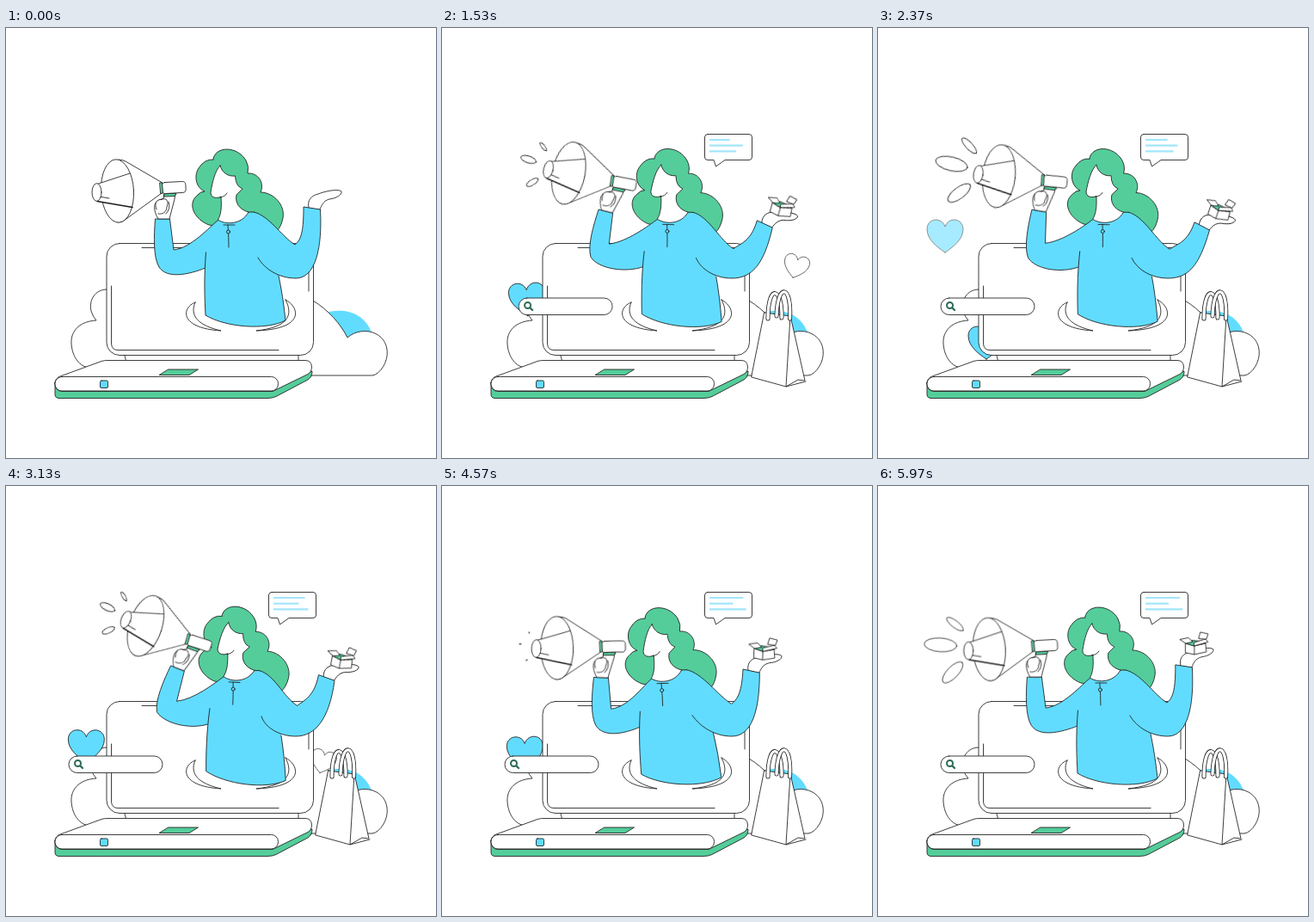
Recreate the animation shown at these times as an HTML page. Size 500x500 px, loop 6 s.

```html
<!DOCTYPE html>
<html lang="en">
<head>
<meta charset="utf-8">
<title>Online announcement</title>
<style>
  html, body { margin: 0; width: 100%; height: 100%; overflow: hidden; background: #fff; }
  svg { display: block; width: 100vw; height: 100vh; }
  .ink { fill: #fff; stroke: #1c1c1c; stroke-width: .85; stroke-linejoin: round; stroke-linecap: round; }
  .line { fill: none; }
  .blue { fill: #61dcff; }
  .green { fill: #54cd9a; }
  .bare { stroke: none; }
  .pop { transform-box: fill-box; transform-origin: center; animation: 6s linear infinite both; }
  #bag { animation-name: bag; }
  #box { animation-name: box; transform-origin: 50% 100%; }
  #bubble { animation-name: bubble; transform-origin: 20% 100%; }
  #search { animation-name: search; }
  @keyframes bag {
    0%, 7% { transform: scale(0); animation-timing-function: ease-out; }
    14% { transform: scale(1.1); animation-timing-function: ease-in-out; }
    19%, 100% { transform: none; }
  }
  @keyframes box {
    0%, 5% { transform: scale(0); animation-timing-function: ease-out; }
    12% { transform: scale(1.12); animation-timing-function: ease-in-out; }
    16%, 100% { transform: none; }
  }
  @keyframes bubble {
    0%, 10% { transform: scale(0); animation-timing-function: ease-out; }
    19%, 100% { transform: none; }
  }
  @keyframes search {
    0%, 15% { transform: translateX(70px); opacity: 0; animation-timing-function: ease-out; }
    20% { opacity: 1; }
    33%, 100% { transform: none; opacity: 1; }
  }
</style>
</head>
<body>
<svg viewBox="0 0 500 500" class="ink">
  <defs>
    <path id="heart" d="M0 19 C-9 13 -21 4 -21 -8 C-21 -21 -4 -23 0 -11 C4 -23 21 -21 21 -8 C21 4 9 13 0 19 Z"/>
  </defs>

  <!-- clouds -->
  <path class="blue bare" d="M372 331 C392 325 416 330 425 354 L397 362 Z"/>
  <path d="M117 304 C104 304 96 316 99 329 Q101 336 105 340 C86 341 75 352 76 367 C77 383 86 394 97 395 L140 390 Z"/>
  <path d="M357 317 C375 328 389 344 397 360 C406 352 420 350 431 356 C445 364 446 381 439 393 Q433 403 426 404 H340 V317 Z"/>
  <g id="hearts"></g>

  <!-- laptop -->
  <rect x="117" y="250.5" width="240.5" height="130" rx="15"/>
  <path class="line" d="M122.500 300 V367 Q123 374.500 130 374.500 H317 M158 255.500 H345 Q352 256 352 263 V306"/>
  <path class="green" d="M57 412 V426 Q57 430.500 62 430.500 H304 Q310 430.500 314 428.500 L351 409 Q356 406 356 399 L316 412 Z"/>
  <path d="M57 413 Q57 407 63 405 L111 387.500 Q114 386.500 118 386.500 H348 Q355 386.500 355.500 394 Q355.500 400 351 402.500 L310 422.500 H65 Q57 422 57 413 Z"/>
  <rect x="57" y="405.500" width="259.500" height="16.500" rx="8"/>
  <path class="green" d="M189 397 H223.500 L213 403.500 H178.500 Z"/>
  <rect class="blue" x="109.500" y="410" width="9" height="8.500" rx="1.500"/>
  <path d="M220 319 C204 325 201 349 250 352 C224 346 213 335 220 319 Z"/>
  <path d="M325 316 C341 324 349 350 291 352 C327 348 335 335 325 316 Z"/>

  <g id="search" class="pop">
    <rect x="73" y="314" width="109" height="19.500" rx="9.700"/>
    <circle class="line" cx="83.500" cy="322.500" r="3.500" stroke="#2b6a55" stroke-width="2"/>
    <path d="M86.500 325.500 L89 328" stroke="#2b6a55" stroke-width="2.300"/>
  </g>

  <g id="bag" class="pop">
    <path d="M375 331 L405 335 L409 352 L422 410 L414 409 L400 417 L360 406 Z"/>
    <path class="line" d="M405 335 L400 417 L423 411"/>
    <g id="handles" class="line"></g>
  </g>

  <g id="bubble" class="pop">
    <path d="M309 123.500 H357 Q360.500 123.500 360.500 127 V150 Q360.500 153.500 357 153.500 H329 L318.500 161 L316 153.500 H309 Q305.500 153.500 305.500 150 V127 Q305.500 123.500 309 123.500 Z"/>
    <g id="lines" stroke="#a2e5fa" stroke-width="2.200" stroke-linecap="butt">
      <path/><path/><path/>
    </g>
  </g>

  <!-- woman -->
  <g class="lean">
    <path class="green" d="M241 152 C244 137 269 137 279 154 Q283 161 281 169 C293 168 301 180 296 191 C311 191 325 206 322 221 Q320 231 315 236 L284 232 L247 224 Q243 231 236 229 C218 222 211 204 222 195 Q226 190 231 190 C221 186 218 172 224 163 Q231 152 241 153 Z"/>
  </g>
  <g id="palm">
    <path d="M352 209 C350 200 355 195 363 193 C373 189 387 187 390 190 C391 194 384 198 376 199 C369 201 367 206 365 211 Z"/>
    <g id="box" class="pop">
      <path d="M358 183 L368 186 L381 183 L382 193 L368 196 L358 194 Z"/>
      <path class="green" d="M358 183 L364 179.500 L381 181 L381 183 L368 186 Z"/>
      <path d="M368 186 V196 M358 183 L351 178.500 L361 176.500 L366 181 Z M368 186 L384 181.500 L381 178 L368 182 Z M373 177 L375 170 L384 172 L382 178 Z"/>
    </g>
  </g>
  <path id="armL" class="blue"/>
  <g class="lean">
    <path class="blue bare" d="M247 223 L232 261 C230 290 231 315 232 334 C255 348 302 352 325 340 Q322 311 317 288 L310 250 L288 214 Z"/>
    <path class="line" d="M232.500 261 C230 290 231 315 232 334 C255 348 302 352 325 340 Q322 311 317 288"/>
  </g>
  <path id="armR" class="blue"/>
  <g class="lean">
    <path d="M249 160 C243 166 240 179 238 191 C238 197 243 198 248 197 L250 196 C251 209 250 217 246.500 223 C255 229 274 229 282 214 C271 211 266 203 268 194 L275 187 Q267 184 266.500 172 C258 173 251 168 249 160 Z"/>
    <path class="line" d="M249 197 Q255 196 257 192 M282 214 L288 214 M253 229 H266 M258 229 Q259 245 259 255"/>
    <circle class="blue" cx="258.500" cy="237" r="2"/>
  </g>

  <!-- megaphone -->
  <g id="horn">
    <g id="sparks"></g>
    <path d="M131 153 Q135 153 139 155 L181 179.500 V192 L137 224 Q134 226 130 226 Z"/>
    <ellipse cx="129.500" cy="189.500" rx="19" ry="36.700" transform="rotate(-3 129.500 189.500)"/>
    <path class="bare" d="M105 181 L116 179 V203 L105 201 Z"/>
    <path class="line" d="M106 181.500 L144 169 M108 196 L120 198"/>
    <path class="line" stroke-width="1.500" d="M106 201.500 L147 208.500"/>
    <ellipse cx="105.500" cy="191" rx="5.500" ry="10.300"/>
    <path d="M184 194 L197 192 L196 199 L190 222 H177 C171 212 171 203 178 200 L183 198 Z"/>
    <path class="green" d="M184 193 L198 192 L196.500 195.500 L184 196 Z"/>
    <path d="M175 211 C172 204 175 199 181 199.500 C186 197 190 201 187 208 C187 214 182 217 177 216 M189 202 Q192 210 186 216"/>
    <rect x="181" y="179" width="28" height="13" rx="4" transform="rotate(-3 195 185)"/>
    <path class="green" d="M179 180 L181.500 179.500 L182.500 192 L180 192.500 Z"/>
  </g>
</svg>

<script>
const LOOP = 6000;
const TIMES = [0, 1530, 2370, 3130, 3970, 5170, LOOP];
const POSE = {
  lean:  [0, 1.8, 1.5, 3, -.2, -2],
  hornX: [182, 190.4, 187.3, 199.5, 190.4, 181],
  hornY: [222, 213, 212.6, 212, 218, 226],
  hornA: [0, 14, 9, 21.3, 13.7, -7.3],
  palmX: [356, 375.5, 377, 373, 360, 361],
  palmY: [209.5, 228, 230.5, 223, 213, 217.5],
  palmA: [0, 16, 19, 11, 1, 6]
};
const $ = id => document.getElementById(id);
const clamp = v => Math.max(0, Math.min(1, v));
const rad = deg => deg * Math.PI / 180;

function add(parent, tag, attrs) {
  const el = document.createElementNS('http://www.w3.org/2000/svg', tag);
  for (const key in attrs) el.setAttribute(key, attrs[key]);
  return parent.appendChild(el);
}
const put = (el, key, value) => el.setAttribute(key, value);

// Smooth periodic curve through the values of one pose channel
function curve(v, t) {
  const n = v.length;
  const time = i => TIMES[(i + n) % n] + LOOP * Math.floor(i / n);
  const val = i => v[(i + n) % n];
  const slope = i => (val(i + 1) - val(i - 1)) / (time(i + 1) - time(i - 1));
  let i = 0;
  while (i < n - 1 && t >= TIMES[i + 1]) i++;
  const span = time(i + 1) - time(i), u = (t - time(i)) / span, w = 1 - u;
  return w * w * (1 + 2 * u) * val(i) + u * u * (3 - 2 * u) * val(i + 1)
    + span * u * w * (w * slope(i) - u * slope(i + 1));
}

// Returns a function placing a local offset in a turned frame at (x, y)
function frame(x, y, deg) {
  const c = Math.cos(rad(deg)), s = Math.sin(rad(deg));
  return (a, b) => [x + a * c - b * s, y + a * s + b * c];
}

for (const d of ['M379 338 C379 296 396 302 395 337', 'M389 335 C390 296 407 298 404.500 338']) {
  add($('handles'), 'path', { d, 'stroke-width': 5 });
  add($('handles'), 'path', { d, stroke: '#fff', 'stroke-width': 3.4 });
}

const sparks = [[73, 184, 19, 8, 4], [90, 160, 12, 4, 38], [87, 216, 16, 6.5, -46]].map(
  ([x, y, rx, ry, turn]) => ({
    x, y, turn,
    el: add($('sparks'), 'ellipse', { rx, ry, 'vector-effect': 'non-scaling-stroke' })
  }));

const heart = (start, blue) => ({
  start,
  el: add($('hearts'), 'use', { href: '#heart', class: blue ? 'blue' : '' })
});
const blueHearts = [870, 2370, 3870].map(s => heart(s, true));
const whiteHearts = [720, 3080, 4750].map(s => heart(s, false));
const lines = [...$('lines').children];

function fly(h, t, life, fade, place) {
  const age = t - h.start;
  const on = age >= 0 && age < life;
  put(h.el, 'visibility', on ? 'visible' : 'hidden');
  if (!on) return;
  put(h.el, 'opacity', clamp((life - age) / fade));
  put(h.el, 'transform', place(age));
}

function blueHeart(age) {
  const p = clamp(age / 1500), e = (1 - Math.cos(Math.PI * p)) / 2;
  const x = 78 + 48 * (1 - e) ** 1.6, y = 366 - 124 * e;
  return `translate(${x} ${y}) rotate(${-8 * Math.sin(2 * Math.PI * p)})`;
}

function whiteHeart(age) {
  const e = 1 - (1 - age / 1150) ** 1.4;
  return `translate(${365 + 57 * e} ${324 - 57 * e}) rotate(15) scale(.7)`;
}

function drawSparks(t) {
  const age = t < 1350 ? -1 : (t - 1350) % 1600;
  put($('sparks'), 'visibility', age < 0 ? 'hidden' : 'visible');
  const k = Math.sin(clamp(age / 550) * Math.PI / 2);
  const reach = .55 + .45 * k;
  put($('sparks'), 'opacity', clamp((1580 - age) / 170));
  for (const s of sparks) {
    const x = 105 + (s.x - 105) * reach, y = 190 + (s.y - 190) * reach;
    put(s.el, 'transform', `translate(${x} ${y}) rotate(${s.turn}) scale(${k})`);
  }
}

function drawWoman(t) {
  const p = {};
  for (const key in POSE) p[key] = curve(POSE[key], t);
  const body = frame(278, 345, p.lean);
  const at = (x, y) => body(x - 278, y - 345);
  for (const g of document.querySelectorAll('.lean')) put(g, 'transform', `rotate(${p.lean} 278 345)`);
  put($('horn'), 'transform', `translate(${p.hornX} ${p.hornY}) rotate(${p.hornA}) translate(-182 -222)`);
  put($('palm'), 'transform', `translate(${p.palmX} ${p.palmY}) rotate(${p.palmA}) translate(-356 -209.5)`);

  const l = frame(p.hornX, p.hornY, p.hornA);
  const crease = l(13, 36), corner = l(-4, 56);
  put($('armL'), 'd', `M${at(247, 223)} C${at(237, 231)} ${[crease[0] + 20, crease[1] - 2]} ${crease}
    L${l(8.5, 0)} L${l(-8.5, 0)} C${l(-10, 20)} ${l(-11, 44)} ${corner}
    C${[corner[0] + 9, corner[1] + 14]} ${at(212, 287)} ${at(232, 279)}`);

  const r = frame(p.palmX, p.palmY, p.palmA);
  const cx = 336 + (p.palmX - 356) * .15, cy = 252 + (p.palmY - 209.5) * .25;
  put($('armR'), 'd', `M${at(288, 214)} C${at(306, 218)} ${[cx - 16, cy - 10]} ${[cx, cy]}
    C${[cx + 8, cy - 6]} ${r(-10, 24)} ${r(-10, -1.5)} L${r(9.5, 1.5)}
    C${r(12, 46)} 360,291 337,291 C318,291 301,281 ${at(293, 267)}`);
}

function draw(t) {
  drawWoman(t);
  drawSparks(t);
  for (const h of blueHearts) fly(h, t, 1600, 180, blueHeart);
  for (const h of whiteHearts) fly(h, t, 1150, 150, whiteHeart);
  const wave = Math.cos(2 * Math.PI * (t - 5970) / 1333);
  [340 + 11 * wave, 346 - 8 * wave, 346 + 8 * wave].forEach(
    (x, i) => put(lines[i], 'd', `M311 ${130 + 6.7 * i} H${x}`));
}

let first;
function tick(now) {
  first ??= now;
  draw((now - first) % LOOP);
  requestAnimationFrame(tick);
}
draw(0);
requestAnimationFrame(tick);
</script>
</body>
</html>
```
